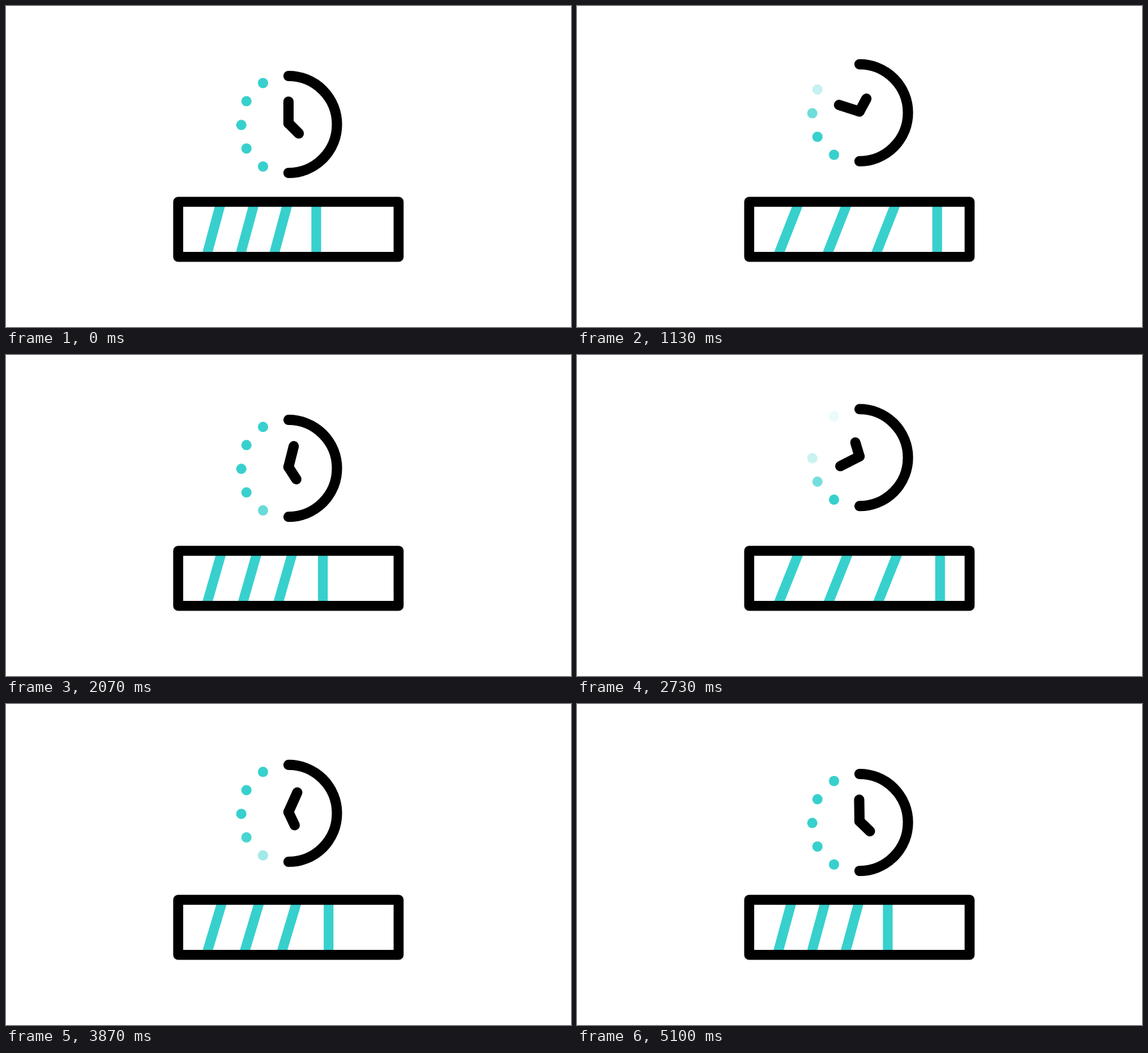
An HTML page for the animation above (5130 ms loop, 880 px wide and 500 px high).

```html
<!DOCTYPE html>
<html lang="en">
<head>
<meta charset="utf-8">
<title>Loading timer</title>
<style>
  html, body { margin: 0; width: 100%; height: 100%; overflow: hidden; background: #fff; }
  svg { display: block; width: 100vw; height: 100vh; }
  .ink { fill: none; stroke: #000; stroke-width: 16; stroke-linecap: round; stroke-linejoin: round; }
  .stripe { stroke: #37d0cd; stroke-width: 15.2; }
  .dot { fill: #37d0cd; }
</style>
</head>
<body>
<svg viewBox="0 0 880 500">
  <g id="stripes"></g>
  <rect class="ink" x="268.2" y="305" width="343.3" height="85.8" style="stroke-width:15.6"/>
  <g id="clock">
    <g id="dots"></g>
    <path class="ink" d="M440 109 A75.5 75.5 0 0 1 440 260"/>
    <path class="ink" id="longHand" d="M440 182.5 V149"/>
    <path class="ink" id="shortHand" d="M440 182.5 L456 198.5"/>
  </g>
</svg>
<script>
const LOOP = 5130, STEPS = 128, CYCLE = 43;
const byId = id => document.getElementById(id);
const clamp01 = v => Math.min(1, Math.max(0, v));

function add(parent, tag, attrs) {
  const node = document.createElementNS('http://www.w3.org/2000/svg', tag);
  for (const key in attrs) node.setAttribute(key, attrs[key]);
  return parent.appendChild(node);
}

// Symmetric cubic bezier (.58, 0, .42, 1), solved by bisection.
function ease(x) {
  if (x <= 0) return 0;
  if (x >= 1) return 1;
  let lo = 0, hi = 1;
  for (let i = 0; i < 24; i++) {
    const t = (lo + hi) / 2, u = 1 - t;
    if (1.74 * t * u * u + 1.26 * t * t * u + t * t * t < x) lo = t; else hi = t;
  }
  return lo * lo * (3 - 2 * lo);
}
const ramp = (j, from, to) => clamp01((j - from) / (to - from));
const easeRamp = (j, from, to) => ease(ramp(j, from, to));
const pulse = (j, a, b, c, d) => easeRamp(j, a, b) - easeRamp(j, c, d);

const dots = [[400.3, 250], [374.5, 222], [366.5, 185.3], [374.5, 148.3], [400.3, 120]]
  .map(([cx, cy]) => add(byId('dots'), 'circle', { class: 'dot', cx, cy, r: 8 }));

const stripes = [314, 366.2, 418.4, 483.2].map((foot, i) => ({
  foot, slant: i < 3 ? 18.9 : 0,
  node: add(byId('stripes'), 'line', { class: 'stripe', y1: 306, y2: 390 })
}));

function drawStripes(stretch) {
  const origin = 311;
  for (const { foot, slant, node } of stripes) {
    const at = y => origin + stretch * (foot - origin + slant * (383 - y) / 70);
    node.setAttribute('x1', at(306));
    node.setAttribute('x2', at(390));
  }
}

function draw(ms) {
  // 25 drawings a second, shown on a 30 Hz grid
  const tick = Math.floor((ms % LOOP + 7) * 0.03);
  const step = Math.min(STEPS - 1, Math.floor((tick + 0.001) / 1.2));
  const j = step % CYCLE;

  const lift = 28 * pulse(j, 0, 19.9, 19.1, 39.6);
  byId('clock').setAttribute('transform', `translate(0 ${-lift})`);

  const turn = 360 * easeRamp(j, 0.4, 43);
  const lag = 35 * pulse(j, 3, 27, 26, 42);
  byId('longHand').setAttribute('transform', `rotate(${turn} 440 182.5)`);
  byId('shortHand').setAttribute('transform', `rotate(${turn - lag} 440 182.5)`);

  dots.forEach((dot, i) => {
    const out = 6.3 + 3.1 * i, back = 17.5 + 2.85 * i;
    dot.setAttribute('opacity', 1 - ramp(j, out, out + 7) + ramp(j, back, back + 6.7));
  });

  drawStripes(1 + 0.48 * pulse(j, 0.8, 25.5, 24, 42.8));
}

const start = performance.now();
function loop() {
  draw(performance.now() - start);
  requestAnimationFrame(loop);
}
loop();
</script>
</body>
</html>
```
